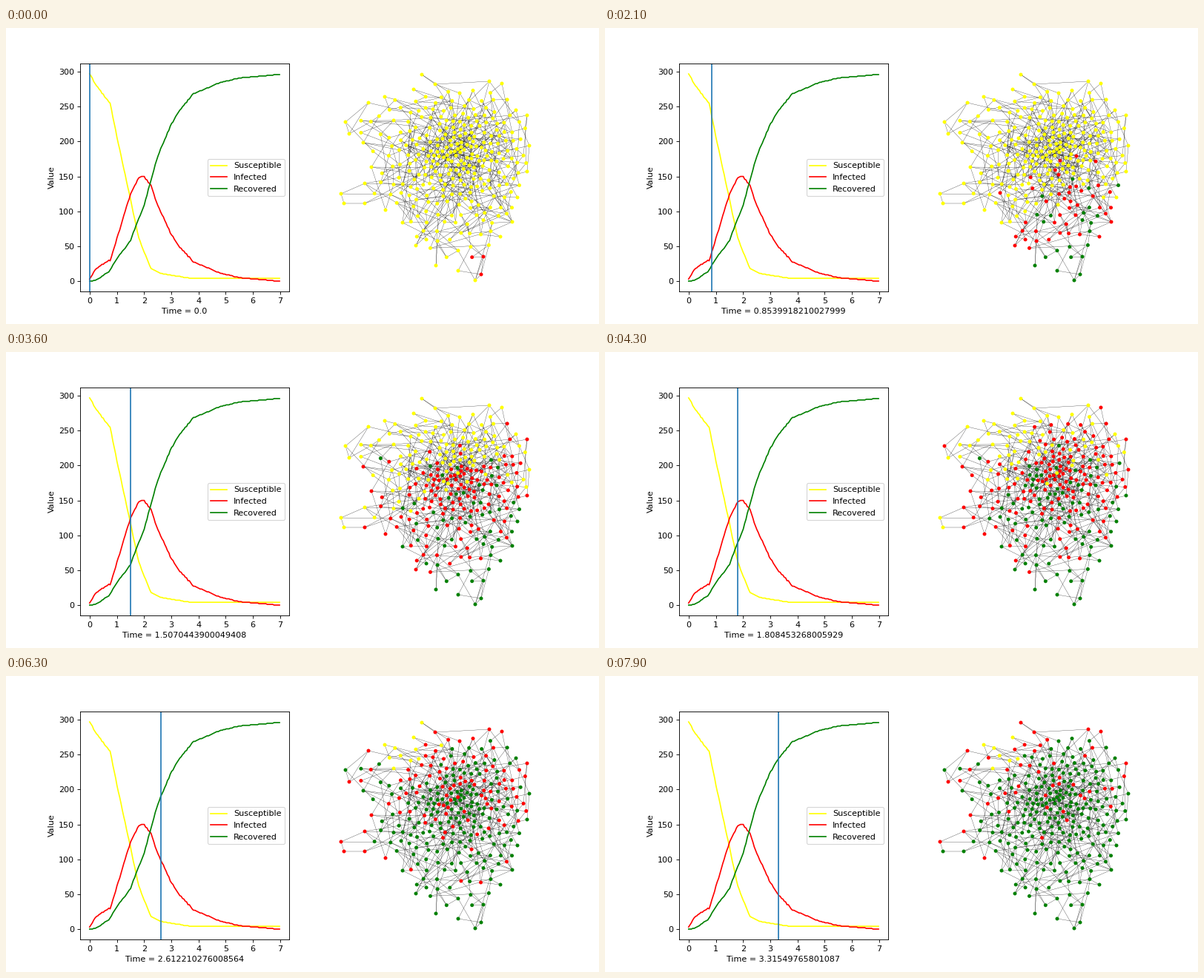
Animation, 800 px wide and 400 px high, one loop 8000 ms. Source, as a matplotlib script:

```python
import numpy as np
import matplotlib.pyplot as plt
from matplotlib.animation import FuncAnimation
from matplotlib.collections import LineCollection
from matplotlib.path import Path

N = 300
STEP = 0.0502348130001647
times = np.arange(140) * STEP
rng = np.random.default_rng(11)


def noisy(t, v):
    """Curve through key points, rougher where it is steep."""
    y = np.interp(times, t, v)
    rough = .25 * np.sqrt(np.abs(np.gradient(y)))
    y = y + rng.normal(0, 1, len(y)) * rough
    return np.round(np.clip(y, min(v), max(v)))


susceptible = np.minimum.accumulate(noisy(
    [0, .2, .5, .75, 1, 1.5, 1.8, 2, 2.25, 2.6, 3.7],
    [297, 283, 267, 255, 208, 118, 62, 42, 19, 11, 4]))
recovered = np.maximum.accumulate(noisy(
    [0, .2, .5, .75, 1, 1.5, 1.8, 2, 2.25, 2.5, 3, 3.3, 3.8, 4.75, 5.5, 6.9],
    [0, 1, 8, 15, 32, 58, 89, 108, 144, 179, 225, 244, 268, 284, 291, 296]))
infected = N - susceptible - recovered

# Outline of the network; its corners are nodes too
outline = [
    (561, 63), (579, 76), (612, 88), (652, 72), (669, 75), (703, 118),
    (706, 159), (703, 194), (690, 229), (683, 262), (667, 282), (644, 309),
    (641, 333), (633, 341), (610, 328), (580, 321), (553, 294), (535, 263),
    (512, 246), (484, 237), (456, 237), (452, 224), (484, 210), (493, 188),
    (482, 155), (463, 143), (458, 127), (489, 101), (511, 93), (550, 83)]


def distance(points, x, y):
    points = np.asarray(points, float)
    return np.hypot(points[..., 0] - x, points[..., 1] - y)


# Fill the outline, denser towards the core
shape = Path(outline)
core = (612, 172)
nodes = list(outline)
while len(nodes) < N:
    if rng.random() < .5:
        p = rng.uniform((450, 63), (706, 341))
    else:
        p = rng.normal(core, (42, 38))
    room = 4.5 + .06 * distance(p, *core)
    if shape.contains_point(p) and distance(nodes, *p).min() > room:
        nodes.append(tuple(p))
nodes = np.array(nodes)

# Links favour close neighbours
gap = np.hypot(*(nodes[:, None] - nodes[None]).transpose(2, 0, 1))
pull = np.where((gap > 0) & (gap < 85), np.exp(-gap / 26), 0)
links = {tuple(sorted((i, int(j)))) for i in range(N)
         for j in rng.choice(N, 2, replace=False, p=pull[i] / pull[i].sum())}

# The outbreak starts at the bottom and reaches the upper left last
caught = distance(nodes, 640, 315) * rng.normal(1, .2, N)
caught += 200 * np.exp(-(distance(nodes, 530, 88) / 45) ** 2)
healed = caught + rng.exponential(100, N)

# Node states follow the counts of the curves
order = np.argsort(caught)
COLORS = np.array(["yellow", "red", "green"])
state = np.zeros(N, int)
states = []
for s, r in zip(susceptible, recovered):
    hit = order[:int(N - s)]
    state[hit] = np.maximum(state[hit], 1)
    sick = np.flatnonzero(state == 1)
    due = int(r) - np.count_nonzero(state == 2)
    state[sick[np.argsort(healed[sick])][:due]] = 2
    states.append(state.copy())

fig, (ax, net) = plt.subplots(1, 2, figsize=(10, 5), dpi=80)
fig.subplots_adjust(left=.125, right=.9, bottom=.11, top=.88, wspace=.2)
ax.plot(times, susceptible, color="yellow", label="Susceptible")
ax.plot(times, infected, color="red", label="Infected")
ax.plot(times, recovered, color="green", label="Recovered")
ax.set_ylabel("Value")
ax.set_xticks(range(8))
ax.set_xlim(-.05 * times[-1], 1.05 * times[-1])
ax.legend(loc="center right")
cursor = ax.axvline(0, color="C0")

# Network axes use stage pixels
net.set_xlim(438.18, 720)
net.set_ylim(356, 48)
net.axis("off")
net.add_collection(LineCollection([nodes[list(e)] for e in links],
                                  colors="black", linewidths=.25, zorder=1))
dots = net.scatter(nodes[:, 0], nodes[:, 1], s=20, linewidths=0, zorder=2)


def update(i):
    # Twelve tenths of a tick per step
    k = (5 * i + 2) // 6
    t = float(k * STEP)
    cursor.set_xdata([t, t])
    ax.set_xlabel(f"Time = {t}")
    dots.set_facecolor(COLORS[states[k]])
    return cursor, dots


anim = FuncAnimation(fig, update, frames=80, interval=100, repeat=True,
                     repeat_delay=0, blit=False)
plt.show()
```
